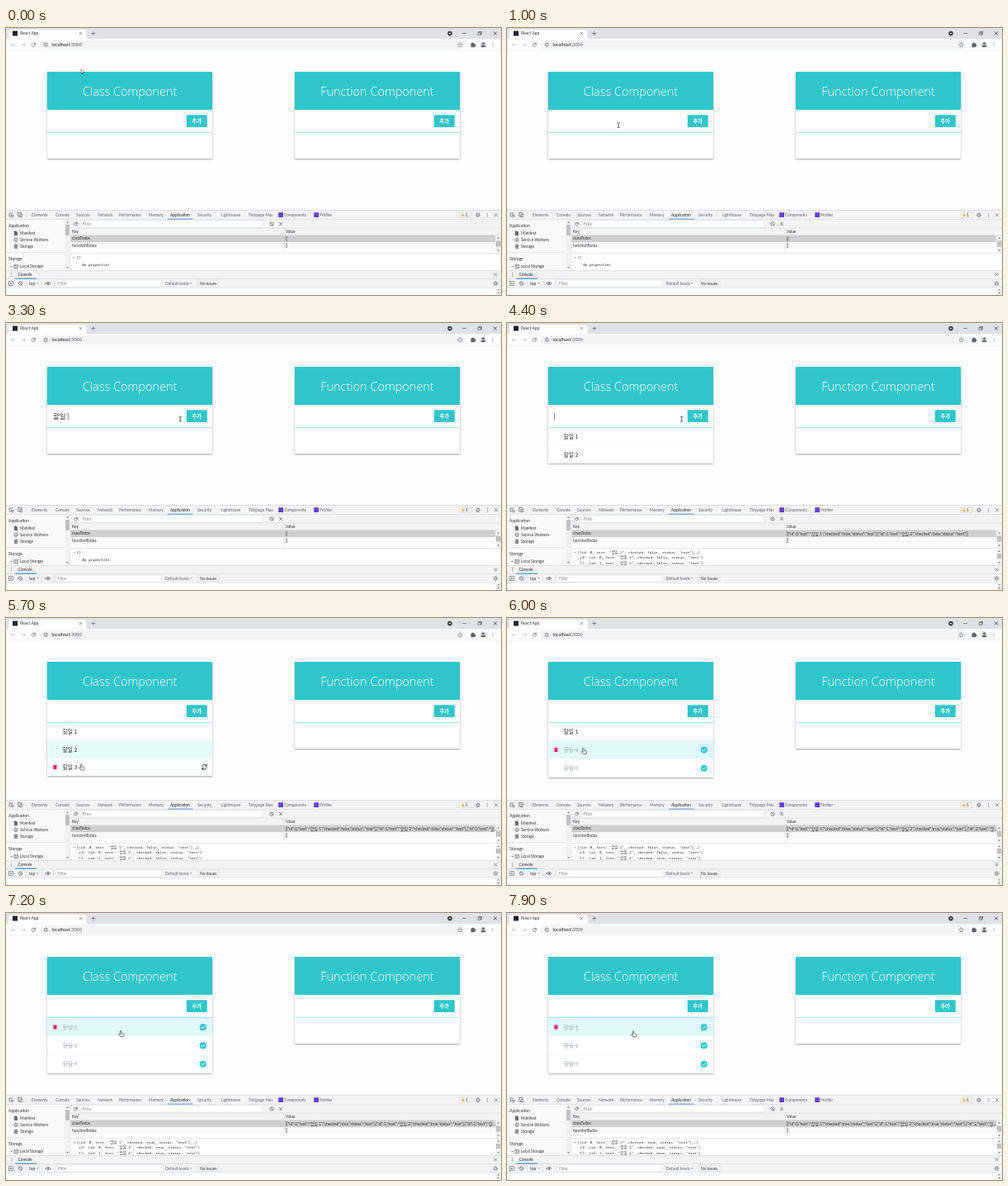
An HTML page for the animation above (8 s loop, 600 px wide and 323 px high).

```html
<!DOCTYPE html>
<html lang="ko">
<head>
<meta charset="utf-8">
<title>Todo demo</title>
<style>
  html, body { margin: 0; width: 100%; height: 100%; overflow: hidden; background: #fff; }
  svg { display: block; width: 100%; height: 100%; font-family: Lato, 'Noto Sans CJK KR', 'Noto Sans CJK', sans-serif; }
  .ko { font-family: 'Noto Sans CJK KR', 'Noto Sans CJK', 'Noto Sans', sans-serif; }
  .mono { font-family: 'Noto Sans Mono', 'Noto Sans CJK KR', monospace; }
  .title { font-family: 'Open Sans', 'Noto Sans', sans-serif; font-weight: 300; }
  .bold { font-weight: 700; }
  .it { font-style: italic; }
  .mid { text-anchor: middle; }
  .done { text-decoration: line-through; }
  .shadow { filter: drop-shadow(0 1px 1.3px rgba(0, 0, 0, .38)); }
</style>
</head>
<body>
<svg id="stage" viewBox="0 0 600 323"></svg>
<script>
const LOOP = 8000, STEP = 100;
const TEAL = '#2ec6cb', GREY = '#5f6368', BAR = '#f1f3f4', LINE = '#cdcfd2', PURPLE = '#6a3fd0';
const LIST_TOP = 126.8;

// Drawing helpers; text is placed by its vertical centre.
const text = (x, y, s, size = 4.8, fill = '#303235', cls = '') =>
  `<text x="${x}" y="${y + size * .35}" font-size="${size}" fill="${fill}" class="${cls}">${s}</text>`;
const rect = (x, y, w, h, fill, extra = '') =>
  `<rect x="${x}" y="${y}" width="${w}" height="${h}" fill="${fill}" ${extra}/>`;
const path = (d, stroke = GREY, width = .7, fill = 'none') =>
  `<path d="${d}" stroke="${stroke}" stroke-width="${width}" fill="${fill}" stroke-linecap="round" stroke-linejoin="round"/>`;
const disc = (x, y, r, fill = GREY, extra = '') => `<circle cx="${x}" cy="${y}" r="${r}" fill="${fill}" ${extra}/>`;
const ring = (x, y, r, c = GREY) => disc(x, y, r, 'none', `stroke="${c}" stroke-width=".7"`);
const cross = (x, y, r = 1.7, c = GREY) => path(`M${x - r} ${y - r}l${2 * r} ${2 * r}m0 ${-2 * r}l${-2 * r} ${2 * r}`, c);
const tri = (x, y, h = 1.2, c = GREY) => path(`M${x - 1.4} ${y - h / 2}h2.8l-1.4 ${h}z`, 'none', 0, c);
const dots = (x, y) => [-1.8, 0, 1.8].map(d => disc(x, y + d, .5)).join('');
const ban = (x, y) => ring(x, y, 2.2) + path(`M${x - 1.5} ${y - 1.5}l3 3`);
const gear = (x, y) => ring(x, y, 1.5) +
  disc(x, y, 2.3, 'none', `stroke="${GREY}" stroke-width=".9" stroke-dasharray="1 .806"`);
const reload = (x, y, r = 2) => path(`M${x + r * .8} ${y - r * .6}A${r} ${r} 0 1 0 ${x + r} ${y + .3}`) +
  path(`M${x + r} ${y - r}v1.6h-1.6z`, GREY, .3, GREY);
const scrollbar = (x, y, w, h, top, len) => rect(x, y, w, h, '#f1f1f1') + rect(x + .5, top, w - 1, len, '#c1c1c1') +
  tri(x + w / 2, y + 3, -1.4) + tri(x + w / 2, y + h - 3, 1.4);

// Pointer tip over time: [ms, x, y]
const moves = [[0, 91, 50], [300, 96, 62], [900, 126, 112], [1400, 172, 140], [1800, 200, 119], [2100, 204, 117],
  [2700, 211, 116], [5200, 212, 116], [5400, 170, 130], [5600, 98, 150], [5680, 92, 168], [5700, 91, 176.5],
  [5800, 91, 176.5], [5900, 92, 158], [6100, 93, 156], [6240, 106, 147], [6300, 113, 146.7], [6500, 120, 141],
  [6900, 128, 141], [7500, 150, 143], [7900, 153, 142.5]];
const added = [3400, 4200, 5100], checked = [6600, 6000, 5800];
const FOCUS = 1900, BLUR = 5800;
const keys = [[0, ''], [FOCUS, '']];
[2700, 3600, 4500].forEach((start, n) => {
  ['ㅎ', '하', '할', '할이', '할일', '할일 '].forEach((s, i) => keys.push([start + i * 100, s]));
  keys.push([added[n], '']);
});

function pointer(t) {
  const i = moves.findIndex(m => m[0] > t);
  if (i < 0) return moves.at(-1).slice(1);
  const [a, b] = [moves[i - 1], moves[i]], k = (t - a[0]) / (b[0] - a[0]);
  return [a[1] + (b[1] - a[1]) * k, a[2] + (b[2] - a[2]) * k];
}

function rowsAt(t) {
  let y = LIST_TOP;
  return added.flatMap((at, i) => {
    if (t < at) return [];
    const done = t >= checked[i], row = { i, y, h: done ? 22.3 : 21.4, done };
    y += row.h;
    return [row];
  });
}

function hovered(t) {
  const [x, y] = pointer(Math.max(t, 0));
  const row = rowsAt(t).find(r => x > 50 && x < 250 && y >= r.y && y < r.y + r.h);
  return row ? row.i : -1;
}

function browser() {
  return rect(0, 0, 600, 323, '#fefefe') + rect(0, 0, 600, 13.5, '#dee1e6') +
    path('M1 13.5Q3 13.5 3 11V4.5Q3 2 5.500 2H95Q97.500 2 97.500 4.500V11Q97.500 13.500 99.500 13.500Z', 'none', 0, '#fff') +
    rect(8, 3.5, 6, 6, '#20232a') + text(17, 6.7, 'React App', 5) + cross(90.5, 6.5, 1.3) +
    path('M103.800 6.500h4m-2 -2v4') + disc(538, 6.6, 2.8, '#3c4043') + tri(538, 6.8, 1.4, '#fff') +
    path('M553.500 6.500h4M572.500 5.300h3v3h-3zM573.500 5.200v-.9h3v3h-.9', '#222', .5) + cross(593, 6.5, 1.7, '#222') +
    rect(0, 13.5, 600, 13.5, '#fff') + rect(0, 26.8, 600, .5, '#dfe1e5') +
    rect(41, 14.8, 516, 11, BAR, 'rx="5.5"') +
    path('M11.500 20.300h-5m2 -2l-2 2l2 2M18.500 20.300h5m-2 -2l2 2l-2 2', '#babcbe') + reload(33.3, 20.3, 2.2) +
    ring(48.3, 20.3, 2.1) + path('M48.300 20.200v1.100M48.300 19v.1', GREY, .6) +
    text(55.5, 20.3, `localhost<tspan fill="${GREY}">:3000</tspan>`, 5.6, '#202124') +
    path('M550.500 17.700l.8 1.800l2 .2l-1.500 1.300l.4 2l-1.700 -1l-1.700 1l.4 -2l-1.500 -1.300l2 -.2z', GREY, .5) +
    path('M563.500 18.500h1.500a1 1 0 0 1 2 0h1.500v1.500a1 1 0 0 1 0 2v1.200h-5z', 'none', 0, GREY) +
    disc(578.5, 20.3, 3.8, '#d5d9de') + disc(578.5, 18.9, 1.4) +
    path('M575.800 23q0 -2.300 2.700 -2.300t2.700 2.300z', 'none', 0, GREY) + dots(590, 20.3);
}

function card(x, title, bottom, body = '') {
  return `<g class="shadow">${rect(x, 53, 200, bottom - 53, '#fff')}</g>` + rect(x, 53, 200, 46, TEAL) +
    text(x + 100, 77, title, 14.5, '#fff', 'title mid') + rect(x + 168.8, 105.3, 25, 14.6, TEAL, 'rx="1"') +
    text(x + 181.3, 112.8, '추가', 6.3, '#fff', 'ko bold mid') + body + rect(x, 126, 200, .8, '#9be2e5');
}

function todoRow({ i, y, h, done }, t, hover) {
  const c = y + h / 2, samples = [0, 1, 2, 3, 4, 5];
  const glow = samples.filter(k => hovered(t - k * 20) === i).length / samples.length;
  let out = rect(50, y, 200, h, '#e2f9f9', `opacity="${glow}"`) + rect(50, y + h - .5, 200, .5, '#eff1f3') +
    text(68.6, c + .3, `할일 ${i + 1}`, 6.7, done ? '#adb5bd' : '#22262a', done ? 'ko done' : 'ko');
  if (i === hover) out += rect(57.4, c - 1.2, 4, 3.8, '#e61f63', 'rx=".5"') +
    path(`M57 ${c - 1.7}h4.800M58.600 ${c - 2.3}h1.600`, '#e61f63', .8);
  if (done) return out + disc(238.8, c + .2, 4.1, '#38c8d4') + path(`M237 ${c + .2}l1.300 1.300l2.400 -2.500`, '#fff', .9);
  if (i === hover) out += path(`M237.700 ${c - .5}a2.900 2.900 0 0 1 5.300 -1.200m.3 -1.500v1.900h-1.900` +
    `M243.300 ${c + .5}a2.900 2.900 0 0 1 -5.300 1.200m-.3 1.500v-1.900h1.900`, '#343a40', .9);
  return out;
}

function input(t) {
  const [at, value] = keys.filter(k => k[0] <= t).at(-1);
  const x = 57.3 + [...value].reduce((w, ch) => w + (ch === ' ' ? 2.2 : 7.7), 0);
  const caret = t >= FOCUS && t < BLUR && (t - at) % 1060 < 530;
  return text(57, 112.8, value, 8.4, '#22262a', 'ko') + (caret ? rect(x, 108.6, .6, 8.4, '#333') : '');
}

function storage(rows) {
  const mono = (x, y, s, cls = '') => text(x, y, s, 4.28, '#25272f', 'mono ' + cls);
  const short = r => `{id: ${r.i}, text: "할일 ${r.i + 1}", checked: ${r.done}, status: "text"}`;
  let value = JSON.stringify(rows.map(r => ({ id: r.i, text: `할일 ${r.i + 1}`, checked: r.done, status: 'text' })));
  if (rows.length > 2) value = value.slice(0, value.lastIndexOf('할') + 1) + '…';
  const out = text(338.5, 254.8, value, 4.9) + tri(82.5, 278);
  if (!rows.length) return out + mono(85.5, 278, '[]') + mono(92, 286.3, 'No properties', 'it');
  const lines = rows.slice(0, 2).map(r => path(`M89 ${282.600 + r.i * 6.2}v2.800l1.400 -1.400z`, 'none', 0, GREY) +
    mono(91.5, 284 + r.i * 6.2, `<tspan fill="#881391">${r.i}</tspan>: ${short(r)}`));
  return out + mono(85.5, 277.8, `[${short(rows[0])}${rows.length > 1 ? ',…' : ''}]`) + lines.join('') +
    (rows.length > 1 ? scrollbar(593.5, 273, 6.5, 20, 279, 6) : '');
}

function devtools(rows) {
  const tabs = [[31, 'Elements'], [60, 'Console'], [85, 'Sources'], [111, 'Network'], [137, 'Performance'],
    [173, 'Memory'], [199, 'Application'], [232, 'Security'], [261, 'Lighthouse'], [294, 'Tidypage Max'],
    [337, 'Components'], [380, 'Profiler']];
  const side = [[250, 'Manifest'], [258, 'Service Workers'], [266, 'Storage']];
  return rect(0, 220.5, 600, 102.5, '#fff') + rect(0, 220.5, 600, 11, BAR) + rect(0, 220.3, 600, .6, LINE) +
    path('M8 224h-4v4h1.800M6.500 226l3 1.100l-1.300 .5l-.5 1.300z') + path('M14.800 223.500h4v2M14.800 223.500v4.500h2M17.300 225.600h2v3h-2z') +
    rect(24, 223, .5, 6, LINE) +
    tabs.map(([x, s]) => text(x, 226.3, s, 4.8, s === 'Application' ? '#202124' : GREY)).join('') +
    rect(196, 230.7, 30.5, 1, '#1a73e8') + rect(330.2, 223.2, 5.8, 5.8, PURPLE) + rect(373.2, 223.2, 5.8, 5.8, PURPLE) +
    rect(550, 222.8, 14, 6.8, BAR, `stroke="${LINE}" stroke-width=".5" rx="1"`) +
    path('M552 227.800l2 -3.500l2 3.500z', 'none', 0, '#f2ab26') + text(557.3, 226.3, '1') +
    gear(572, 226.2) + dots(583.5, 226.2) + cross(594, 226.2) + rect(0, 231.4, 600, .5, LINE) +
    // sidebar
    rect(0, 232, 77.5, 61, '#f8f9fa') + text(3, 239, 'Application', 5) +
    side.map(([y, s]) => text(17, y - 1.8, s)).join('') +
    path('M10.200 245.800h2.200l1.400 1.400v3.600h-3.600z', GREY, .4, GREY) + gear(12, 256.2) +
    [0, 1.8, 3.6].map(d => rect(9.8, 262 + d, 4.4, 1.2, GREY, 'rx=".5"')).join('') +
    rect(0, 271.6, 72, .5, LINE) + text(3, 279, 'Storage', 5) + tri(6.5, 288.6) +
    rect(10, 286.5, 4.5, 4.2, 'none', `stroke="${GREY}" stroke-width=".6"`) + path('M10 288h4.500M12.200 288v2.700', GREY, .5) +
    text(17, 288.6, 'Local Storage') + scrollbar(71.5, 232, 6, 61, 238, 13) + rect(77.7, 232, .5, 61, LINE) +
    // storage table
    rect(78.2, 232, 521.8, 10, BAR) + reload(84.5, 237, 1.9) +
    rect(90, 233, 222, 8, '#fff', `stroke="${LINE}" stroke-width=".4"`) + text(92.5, 237.1, 'Filter', 4.8, '#80868b') +
    ban(322, 237) + cross(333, 237) + rect(78.2, 242, 521.8, 8.6, BAR) + rect(78.2, 241.8, 521.8, .5, LINE) +
    rect(78.2, 250.4, 521.8, .5, LINE) + text(80, 246.4, 'Key') + text(339, 246.4, 'Value') +
    rect(78.2, 250.7, 515.3, 8.3, '#cfcfcf') + rect(78.2, 259, 515.3, 8, '#f7f8f9') +
    text(80, 254.8, 'classTodos') + text(80, 263, 'functionTodos') + text(338.5, 263, '[]', 4.9) +
    rect(336.8, 242, .5, 30, LINE) + scrollbar(593.5, 250.8, 6.5, 21.5, 257.5, 7) + rect(78.2, 272.4, 521.8, .5, LINE) +
    storage(rows) +
    // console drawer
    rect(0, 293, 600, 30, '#fff') + rect(0, 293, 600, 21, BAR) + rect(0, 293, 600, .5, LINE) + rect(0, 303.3, 600, .5, LINE) +
    dots(6.5, 298.3) + text(14.5, 298.4, 'Console', 4.8, '#202124') +
    rect(11, 302.6, 26, .9, '#1a73e8') + cross(593.5, 298.3) +
    rect(3.5, 306.7, 5, 4.8, 'none', `stroke="${GREY}" stroke-width=".6"`) + path('M5.200 307.700v2.800l2 -1.400z', 'none', 0, GREY) +
    ban(17.5, 309) + rect(24, 305.5, .5, 7, LINE) + text(28, 309.1, 'top') + tri(38.5, 309) + rect(43.5, 305.5, .5, 7, LINE) +
    path('M48 309q3 -3.600 6 0q-3 3.600 -6 0z') + disc(51, 309, 1) + rect(58, 305.5, .5, 7, LINE) +
    rect(60.5, 305, 128, 8, '#fff', `stroke="${LINE}" stroke-width=".4"`) + text(63, 309.1, 'Filter', 4.8, '#80868b') +
    text(193, 309.1, 'Default levels', 4.8, GREY) + tri(224, 309) +
    rect(232, 305, 26, 8, 'none', `stroke="${LINE}" stroke-width=".4"`) + text(235, 309.1, 'No Issues') + gear(593.5, 309) +
    rect(0, 313.8, 600, .5, LINE) + rect(593.5, 314.3, 6.5, 8.7, '#f1f1f1') + tri(596.8, 316.6, -1.4) + tri(596.8, 320.8, 1.4);
}

function cursor(t, hover) {
  const [x, y] = pointer(t);
  const shapes = {
    beam: path('M-1.300 -3q1.300 0 1.300 .8v4.400q0 .8 -1.300 .8M1.300 -3q-1.300 0 -1.300 .8M1.300 3q-1.300 0 -1.300 -.8', '#222', .7),
    hand: path('M-.7 .5q.7 -1 1.400 0v2.700l3 .8q.7 .3 .5 1.200l-.6 2.300h-3.800l-2.300 -3q0 -1 1.800 .2z', '#222', .6, '#fff'),
    arrow: path('M0 0v5l1.200 -1.100l.9 1.900l.8 -.4l-.9 -1.800h1.600z', '#222', .5, '#fff')
  };
  const inInput = x > 55 && x < 216 && y > 101 && y < 125;
  const kind = inInput ? 'beam' : hover >= 0 ? 'hand' : 'arrow';
  return `<g transform="translate(${x} ${y})">${shapes[kind]}</g>`;
}

function scene(t) {
  const rows = rowsAt(t), hover = hovered(t), last = rows.at(-1);
  const bottom = Math.max(158, last ? last.y + last.h : 0);
  const list = rows.map(r => todoRow(r, t, hover)).join('');
  return browser() + card(50, 'Class Component', bottom, list + input(t)) + card(350, 'Function Component', 158) +
    devtools(rows) + cursor(t, hover);
}

const stage = document.getElementById('stage');
let shown = -1;
function tick() {
  const t = Math.floor(performance.now() % LOOP / STEP) * STEP;
  if (t !== shown) stage.innerHTML = scene(shown = t);
  requestAnimationFrame(tick);
}
tick();
</script>
</body>
</html>
```
